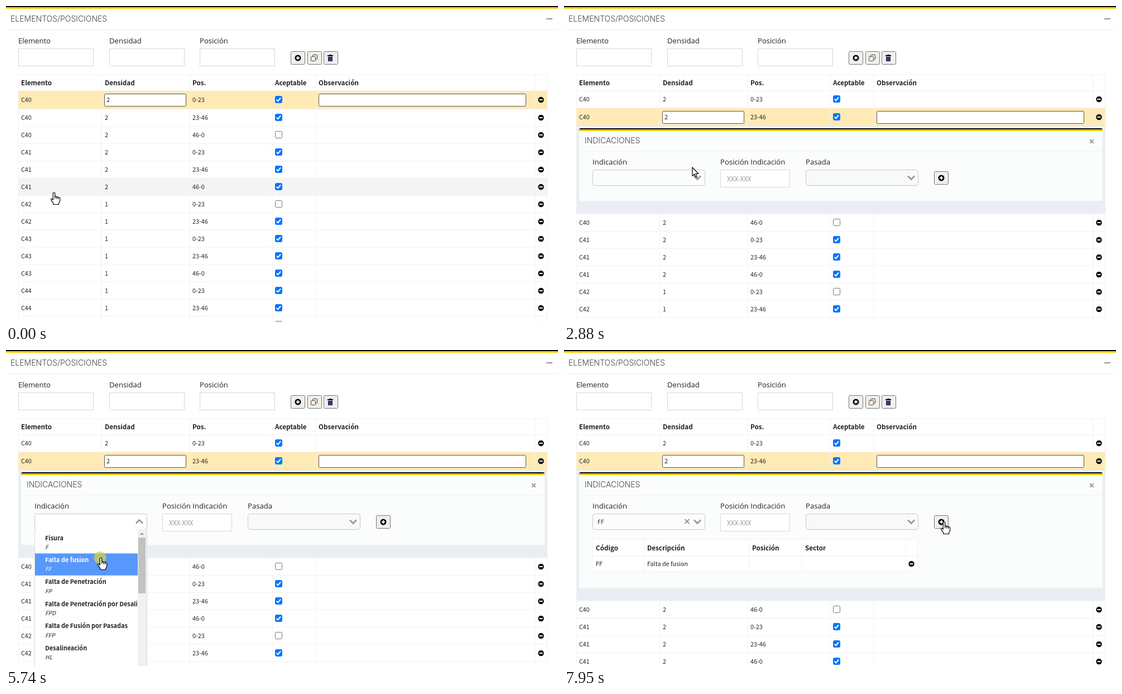
An HTML page with a canvas that plays this animation: 989x566 px, repeating every 8 s.

```html
<!DOCTYPE html>
<html lang="es">
<head>
<meta charset="utf-8">
<title>Elementos/Posiciones</title>
<style>
html, body { margin: 0; width: 100%; height: 100%; overflow: hidden; background: #fff; }
canvas { display: block; }
</style>
</head>
<body>
<canvas id="stage" width="989" height="566"></canvas>
<script>
const ctx = document.getElementById('stage').getContext('2d');
const LOOP = 8000;
const EXPAND = 1870, OPEN = 3710, CHOOSE = 5880, ADDED = 7950;
const CLICKS = [[1690, EXPAND], [3520, OPEN], [5740, CHOOSE], [7770, ADDED]];

const TITLE = 'Inter, sans-serif';
const LABEL = '"Open Sans", "Noto Sans", sans-serif';
const TABLE = '"Noto Sans CJK JP", "Noto Sans CJK SC", "Noto Sans CJK", "Noto Sans", sans-serif';
const BODY = '10.75px ' + TABLE, HEAD = 'bold 11.65px ' + TABLE;
const LINE = '#f2f2f2', FIELD = '#d2d6de', GRAY = '#999';

const COLUMNS = [22, 171, 329, 477, 555, 948, 970];
const POSITIONS = ['0-23', '23-46', '46-0'];
const UNCHECKED = [2, 6, 13];
const ROWS = [['C40', 2, 3], ['C41', 2, 3], ['C42', 1, 2], ['C43', 1, 3], ['C44', 1, 3]]
  .flatMap(([name, density, count]) => POSITIONS.slice(0, count).map(pos => [name, density, pos]));
const OPTIONS = [['Fisura', 'F'], ['Falta de fusion', 'FF'], ['Falta de Penetración', 'FP'],
  ['Falta de Penetración por Desalineación', 'FPD'], ['Falta de Fusión por Pasadas', 'FFP'], ['Desalineación', 'HL']];
const OPTION_TOP = 325, OPTION_HEIGHT = 39.4;

// Pointer hotspot: time, x, y
const PATH = [
  [50, 86, 334], [200, 88, 315], [400, 91, 262], [600, 92, 215], [790, 91, 181], [900, 90, 174],
  [1050, 84, 184], [1260, 80, 197], [1510, 82, 206], [2500, 82, 206], [2700, 150, 240],
  [2950, 260, 308], [3130, 260, 308], [3320, 245, 308], [4200, 245, 308], [4500, 222, 340],
  [4750, 185, 376], [4980, 169, 369], [5100, 170, 372], [5880, 170, 372], [6180, 189, 365],
  [6510, 325, 335], [6800, 480, 318], [7100, 650, 297], [7220, 694, 298], [7280, 684, 311],
  [7410, 684, 311], [7590, 681, 308]
];
const HAND = new Path2D('M-1.7 1.8Q-1.6 0 0 0Q1.6 0 1.7 1.8V7.2Q3 6.3 4.6 7.8Q6.2 7 7.5 8.7Q10.6 8.2 10.6 11V15' +
  'Q10.4 17.5 8.6 19V21.5H-1V19.4L-5 13.8Q-6 12 -4.5 11.4Q-3.2 11.2 -1.7 13.2Z');
const KNUCKLES = new Path2D('M1.7 7V11M4.6 8V11.5M7.5 9V12');
const ARROW = new Path2D('M0 0V15.5L3.6 12.2L6.2 18L8.6 17L6 11.4H10.8Z');

function rect(x, y, w, h, fill) {
  ctx.fillStyle = fill;
  ctx.fillRect(x, y, w, h);
}
function box(x, y, w, h, fill, border, radius = 0) {
  ctx.beginPath();
  ctx.roundRect(x + .5, y + .5, w - 1, h - 1, radius);
  ctx.fillStyle = fill;
  ctx.fill();
  ctx.strokeStyle = border;
  ctx.lineWidth = 1;
  ctx.stroke();
}
function path(points, color, width) {
  ctx.beginPath();
  points.forEach(([x, y], i) => i ? ctx.lineTo(x, y) : ctx.moveTo(x, y));
  ctx.strokeStyle = color;
  ctx.lineWidth = width;
  ctx.stroke();
}
function disc(x, y, r, color) {
  ctx.beginPath();
  ctx.arc(x, y, r, 0, 7);
  ctx.fillStyle = color;
  ctx.fill();
}
function text(str, x, middle, font, color = '#222') {
  ctx.font = font;
  ctx.fillStyle = color;
  ctx.fillText(str, x, Math.round(middle + 4));
}
function cross(x, y, r, width) {
  path([[x - r, y - r], [x + r, y + r]], GRAY, width);
  path([[x - r, y + r], [x + r, y - r]], GRAY, width);
}
function chevron(x, y, dir) {
  path([[x - 6, y - 3 * dir], [x, y + 3 * dir], [x + 6, y - 3 * dir]], GRAY, 2.8);
}
function minusIcon(x, y) {
  disc(x, y, 5.2, '#000');
  rect(x - 3, y - 1, 6, 2, '#fff');
}
function button(x, y) {
  box(x, y, 26, 24, '#efefef', '#767676', 2);
}
function plusButton(x, y) {
  button(x, y);
  disc(x + 13, y + 12, 5.5, '#000');
  rect(x + 10, y + 11, 6, 2, '#fff');
  rect(x + 12, y + 9, 2, 6, '#fff');
}
function checkbox(y, checked) {
  box(482, y - 6.5, 13, 13, checked ? '#0075ff' : '#fff', checked ? '#0075ff' : '#767676', 2);
  if (checked) path([[484.8, y + .2], [487.3, y + 2.8], [492, y - 3]], '#fff', 2);
}
function grid(columns, top, height) {
  columns.forEach(x => rect(x - .5, top, 1, height, LINE));
  rect(columns[0], top + height - .5, columns.at(-1) - columns[0], 1, LINE);
}

function drawHeader() {
  rect(0, 0, 989, 2, '#000');
  rect(0, 2, 989, 3, '#fc0');
  text('ELEMENTOS/POSICIONES', 8, 24, '300 14px ' + TITLE, '#444');
  rect(968, 22, 11, 2, '#8f959e');
  rect(0, 42, 989, 1, '#f0f0f0');
  [['Elemento', 22], ['Densidad', 185], ['Posición', 347]].forEach(([label, x]) => {
    text(label, x, 63, '13.1px ' + LABEL);
    box(x, 76, 135, 32, '#fff', FIELD);
  });
  plusButton(510, 81);
  button(540, 81);
  box(549, 87, 9, 9, '#efefef', '#333', 1);
  box(546, 90, 9, 9, '#efefef', '#6b3a12', 1);
  button(569, 81);
  rect(576, 88, 10, 2, '#000');
  rect(579, 87, 4, 1, '#000');
  rect(577, 91, 8, 8, '#14205c');
  [579, 581, 583].forEach(x => rect(x - .3, 92, .7, 6, '#6677aa'));

  rect(22, 122.5, 948, 1, LINE);
  grid(COLUMNS, 123, 29);
  ['Elemento', 'Densidad', 'Pos.', 'Aceptable', 'Observación'].forEach((label, i) =>
    text(label, [27, 177, 334, 482, 560][i], 137.5, HEAD));
}

function drawRow(index, top, height, selected, hovered) {
  const [name, density, pos] = ROWS[index], y = top + height / 2;
  if (selected || hovered) rect(22, top, 948, height, selected ? '#ffeab6' : '#f4f4f4');
  grid(COLUMNS, top, height);
  if (selected) {
    const fieldTop = Math.round(y - 11.5);
    box(176, fieldTop, 147, 23, '#fff', '#555', 2);
    box(560, fieldTop, 372, 23, '#fff', '#555', 2);
  }
  text(name, 27, y, BODY);
  text(density, selected ? 180 : 177, y, BODY);
  text(pos, 334, y, BODY);
  checkbox(Math.round(y) - .5, !UNCHECKED.includes(index));
  minusIcon(958.5, Math.round(y));
}

function drawPanel(t, added) {
  const extra = added ? 77 : 0, open = t >= OPEN && t < CHOOSE;
  rect(22, 216, 948, 156.5 + extra, '#eaeef3');
  ctx.save();
  ctx.beginPath();
  ctx.roundRect(27, 219, 938, 130 + extra, 3);
  ctx.clip();
  rect(27, 219, 938, 131 + extra, '#fbfdfc');
  rect(27, 219, 938, 2, '#000');
  rect(27, 221, 938, 3, '#fc0');
  ctx.restore();
  text('INDICACIONES', 37, 242, '300 14px ' + TITLE, '#444');
  cross(945.5, 242.5, 3.2, 2);
  rect(27, 260, 938, 1, '#f2f4f3');
  [['Indicación', 51], ['Posición Indicación', 280], ['Pasada', 433]].forEach(([label, x]) =>
    text(label, x, 280, '13.1px ' + LABEL));

  box(51, 293, 202, 29, open ? '#fff' : '#fbfdfc', '#c8c8c8', 4);
  chevron(239, 307.5, t >= OPEN + 110 && open ? -1 : 1);
  if (t >= CHOOSE) {
    text('FF', 60, 307.5, BODY, '#333');
    cross(220.5, 307, 4, 2);
  }
  box(280, 293, 125, 32, '#fff', FIELD);
  text('XXX-XXX', 292, 310, '11.7px ' + TABLE, GRAY);
  box(433, 293, 202, 29, '#f8f9f9', '#c8c8c8', 4);
  chevron(622, 307.5, 1);
  plusButton(663, 296);

  if (added) {
    const columns = [51, 144, 332, 426, 612, 634];
    rect(51, 339, 583, 58, '#fff');
    rect(51, 339, 583, 1, LINE);
    grid(columns, 339, 30);
    grid(columns, 369, 28);
    ['Código', 'Descripción', 'Posición', 'Sector'].forEach((label, i) =>
      text(label, [57, 149, 337, 432][i], 354.5, HEAD));
    text('FF', 57, 383, BODY);
    text('Falta de fusion', 149, 383, BODY);
    minusIcon(622.5, 383);
  }
  return 372.5 + extra;
}

function drawOptions(alpha, pointerY) {
  ctx.save();
  ctx.globalAlpha = alpha;
  rect(51, 321, 202, 245, '#d8d8d8');
  rect(52, 321, 200, 245, '#fff');
  rect(236, 321, 16, 245, '#f1f1f1');
  rect(237, 336, 13, 100, '#c1c1c1');
  ctx.beginPath();
  ctx.moveTo(239.5, 331);
  ctx.lineTo(243.5, 327);
  ctx.lineTo(247.5, 331);
  ctx.fillStyle = '#a0a0a0';
  ctx.fill();
  ctx.beginPath();
  ctx.rect(52, 322, 184, 244);
  ctx.clip();
  const marked = Math.floor((pointerY - OPTION_TOP) / OPTION_HEIGHT);
  OPTIONS.forEach(([label, code], i) => {
    const top = OPTION_TOP + i * OPTION_HEIGHT, color = i === marked ? '#fff' : '#222';
    if (i === marked) rect(52, top, 184, OPTION_HEIGHT, '#5897fb');
    text(label, 70, top + 11.5, 'bold 10.9px ' + TABLE, color);
    text(code, 70, top + 28, 'italic 10.2px ' + TABLE, color);
  });
  ctx.restore();
}

function pointerAt(t) {
  const next = PATH.findIndex(key => key[0] > t);
  if (next === 0) return PATH[0].slice(1);
  if (next < 0) return PATH.at(-1).slice(1);
  const [t0, x0, y0] = PATH[next - 1], [t1, x1, y1] = PATH[next], k = (t - t0) / (t1 - t0);
  return [x0 + (x1 - x0) * k, y0 + (y1 - y0) * k];
}

function drawPointer(t, x, y) {
  if (CLICKS.some(([from, to]) => t >= from && t < to)) disc(x - 1.5, y, 11, 'rgba(205,212,70,.75)');
  const listOpen = t >= OPEN && t < CHOOSE;
  const onSelect = x > 51 && x < 252 && y > 293 && y < 321;
  const onButton = x > 663 && x < 689 && y > 296 && y < 320;
  const hand = t < EXPAND || y < 216 || onButton || (listOpen && y >= 321);
  ctx.save();
  ctx.translate(Math.round(x), Math.round(y));
  if (onSelect) {
    path([[-3.5, -7.5], [-1, -7.5], [.5, -6.5], [2, -7.5], [4.5, -7.5]], '#000', 1);
    path([[-3.5, 7.5], [-1, 7.5], [.5, 6.5], [2, 7.5], [4.5, 7.5]], '#000', 1);
    path([[.5, -7], [.5, 7]], '#000', 1.4);
  } else {
    const shape = hand ? HAND : ARROW;
    ctx.fillStyle = '#fff';
    ctx.strokeStyle = '#000';
    ctx.lineWidth = 1.2;
    ctx.lineJoin = 'round';
    ctx.fill(shape);
    ctx.stroke(shape);
    if (hand) ctx.stroke(KNUCKLES);
  }
  ctx.restore();
}

function draw(t) {
  const [x, y] = pointerAt(t), expanded = t >= EXPAND, selected = expanded ? 1 : 0;
  rect(0, 0, 989, 566, '#fff');
  drawHeader();
  let top = 152;
  for (let i = 0; i < ROWS.length && top < 566; i++) {
    const height = i === selected ? 32.6 : 30.95;
    drawRow(i, top, height, i === selected, !expanded && y >= top && y < top + height);
    top += height;
    if (expanded && i === selected) top = drawPanel(t, t >= ADDED);
  }
  if (t >= OPEN && t < CHOOSE + 110) {
    const alpha = t < CHOOSE ? Math.min(1, .12 + .88 * (t - OPEN) / 110) : 1 - (t - CHOOSE) / 110;
    drawOptions(alpha, y);
    if (t < CHOOSE && Math.floor((t - OPEN) / 530) % 2 === 0) rect(60, 300, 1, 16, '#000');
  }
  drawPointer(t, x, y);
}

function tick() {
  draw(performance.now() % LOOP);
  requestAnimationFrame(tick);
}
tick();
</script>
</body>
</html>
```
